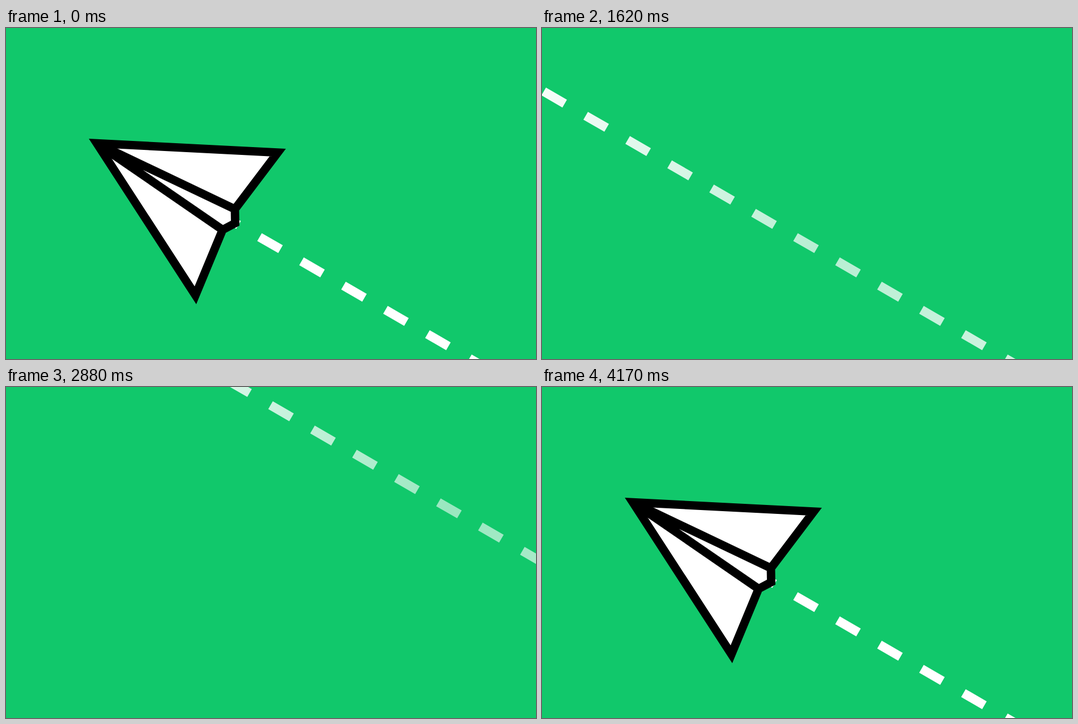
Write an HTML page that moves like this. It is 947x592 px and loops after 6 s.

```html
<!DOCTYPE html>
<html lang="en">
<head>
<meta charset="utf-8">
<title>Paper plane</title>
<style>
  html, body { margin: 0; width: 100%; height: 100%; overflow: hidden; background: #11c86b; }
  svg { display: block; width: 947px; height: 592px; }
</style>
</head>
<body>
<svg viewBox="0 0 947 592">
  <defs>
    <linearGradient id="fadeA" gradientUnits="userSpaceOnUse" y1="0" y2="0"></linearGradient>
    <linearGradient id="fadeB" gradientUnits="userSpaceOnUse" y1="0" y2="0"></linearGradient>
  </defs>
  <rect width="947" height="592" fill="#11c86b"/>
  <g fill="none" stroke-width="16.2" stroke-dasharray="43.33 43.32">
    <path id="trailA" stroke="url(#fadeA)"/>
    <path id="trailB" stroke="url(#fadeB)"/>
  </g>
  <g id="plane" fill="#fff" stroke="#000" stroke-width="15">
    <path d="M162.3 206.2L485.5 222.8L409 324L409.5 349L387 361L338.5 478Z"/>
    <path d="M409 324L162.3 206.2L387 361" fill="none"/>
  </g>
</svg>
<script>
const LOOP = 6000, STEP = 30;
const REST = { x: 148, y: 198 };          // nose of the resting plane
const ANGLE = Math.atan2(43.4, 75);       // slope of both trails
const HEAD_GAP = 28.5;                    // trail head lies this far behind the nose
const $ = id => document.getElementById(id);
const clamp = v => Math.min(1, Math.max(0, v));
const ease = u => (1 - Math.cos(Math.PI * clamp(u))) / 2;

function makeTrail(name, x, y, dir, center) {
  const path = $('trail' + name), gradient = $('fade' + name);
  const along = px => (px - x) * dir / Math.cos(ANGLE);
  const turn = ANGLE * 180 / Math.PI + (dir < 0 ? 180 : 0);
  path.setAttribute('transform', `translate(${x} ${y}) rotate(${turn})`);
  const from = center - 500, to = center + 900;
  gradient.setAttribute('x1', along(from));
  gradient.setAttribute('x2', along(to));
  const stops = [0, 500 / 1400, 1].map(offset => {
    const stop = document.createElementNS('http://www.w3.org/2000/svg', 'stop');
    stop.setAttribute('offset', offset);
    stop.setAttribute('stop-color', '#fff');
    return gradient.appendChild(stop);
  });
  return (headX, age) => {
    const u = clamp(age);
    const length = Math.max(0, along(headX));
    path.setAttribute('d', `M0 0H${length}`);
    path.style.display = length > 0 && u < 1 ? '' : 'none';
    // the middle fades sooner than both ends
    stops.forEach((stop, i) =>
      stop.setAttribute('stop-opacity', 1 - Math.pow(u, i === 1 ? 2.1 : 6)));
  };
}

const drawTrailA = makeTrail('A', 940.5, 656, -1, 500);
const drawTrailB = makeTrail('B', 322.65, -54.25, 1, 790);

// upper flight, left to right
function crossing(t) {
  const s = t - 2040;
  const d = 1.382 * s + 0.00056 * s * s;
  return { x: 809.5 + d, y: 217.5 + d * Math.tan(ANGLE), turn: 178.95 };
}

function nose(t) {
  if (t < 1680) {
    const d = 876 * ease((t - 1080) / 1000);
    return { x: REST.x - d, y: REST.y - d * 0.601, turn: 0 };
  }
  if (t < 2700) return crossing(t);
  const d = 975 * (1 - ease((t - 3300) / 870));
  return { x: REST.x + d, y: REST.y + d * 0.552, turn: 0 };
}

function draw(t) {
  const p = nose(t);
  $('plane').setAttribute('transform',
    `translate(${p.x} ${p.y}) rotate(${p.turn}) translate(${-REST.x} ${-REST.y})`);

  const leaving = t < 3000;
  const headA = leaving && t >= 1680 ? -200 : p.x + HEAD_GAP;
  drawTrailA(headA, leaving ? t / 2860 : 0);

  const headB = t < 1680 ? 0 : t < 2700 ? p.x - HEAD_GAP : 1300;
  drawTrailB(headB, (t - 1425) / 2175);
}

const start = performance.now();
function tick() {
  const t = (performance.now() - start) % LOOP;
  draw(Math.floor(t / STEP) * STEP);
  requestAnimationFrame(tick);
}
tick();
</script>
</body>
</html>
```
